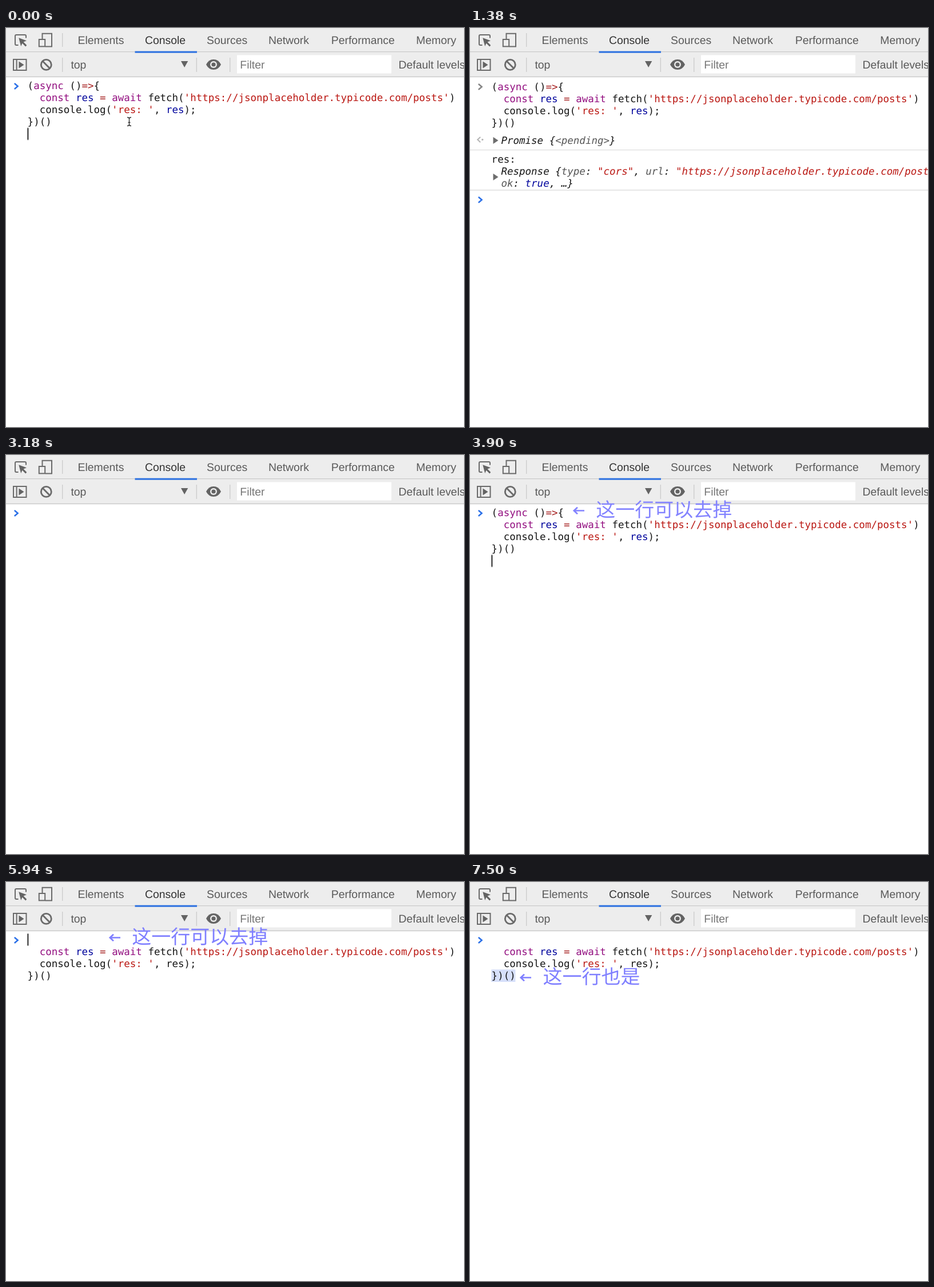
An HTML page that plays this animation: 801x699 px, repeating every 8 s.

```html
<!DOCTYPE html>
<html lang="zh-CN">
<head>
<meta charset="utf-8">
<title>Console await</title>
<style>
html, body { margin: 0; width: 100%; height: 100%; overflow: hidden; background: #fff; }
svg { display: block; width: 801px; height: 699px; }
text { white-space: pre; text-rendering: geometricPrecision; }

.ui { font: 19.4px "Liberation Sans", Arial, sans-serif; fill: #5a5a5a; }
.code { font: 17.5px "DejaVu Sans Mono", Menlo, monospace; fill: #161616; }
.it { font-style: italic; }
.k { fill: #930f80; }
.s { fill: #ba1712; }
.o { fill: #a31a1a; }
.v { fill: #00049c; }
.g { fill: #565656; }
.icon { fill: none; stroke: #6a6a6a; stroke-width: 2; }
.solid { fill: #636363; }
.rule { stroke: #cacaca; stroke-width: 1.3; }
.thin { stroke: #dedede; stroke-width: 1.3; }
.chev { fill: none; stroke-width: 2.5; }
.sel { fill: #d6dffa; }
.note { font: 34px "Noto Sans CJK SC", "Noto Sans CJK", sans-serif; fill: #7f7fff; }
.note path { fill: none; stroke: #7f7fff; stroke-width: 2.7; }

/* One shared 8 s clock; percentages are ms / 80. */
.a { animation: 8s step-end -10ms infinite; }
.pointer { animation-name: pointer; }
.caret { animation-name: caret; }
.prompt { animation-name: prompt; }
.cmd { animation-name: cmd; }
.first { animation-name: first; }
.name { animation-name: name; }
.ran { animation-name: ran; }
.reply { animation-name: reply; }
.split { animation-name: split; }
.sel1 { animation-name: sel1; }
.sel2 { animation-name: sel2; }
.note1 { animation-name: note1; animation-timing-function: linear; }
.note2 { animation-name: note2; animation-timing-function: linear; }

@keyframes pointer { 0% { opacity: 1 } 6%, 100% { opacity: 0 } }
@keyframes caret {
  0% { transform: translateY(84.5px); opacity: 1 }
  6% { transform: translateY(84.5px); opacity: 0 }
  9.75% { transform: translateY(127.5px); opacity: 1 }
  14.25% { transform: translateY(199.5px); opacity: 1 }
  16% { transform: translateY(199.5px); opacity: 0 }
  22.25% { transform: translateY(199.5px); opacity: 1 }
  28.5% { transform: translateY(199.5px); opacity: 0 }
  31.5% { transform: none; opacity: 0 }
  33.75% { transform: none; opacity: 1 }
  39.75% { transform: none; opacity: 0 }
  45.75% { transform: translateY(84.5px); opacity: 1 }
  51.75% { transform: translateY(84.5px); opacity: 0 }
  54.75% { transform: translateY(63px); opacity: 1 }
  55.5% { transform: translateY(42px); opacity: 1 }
  56.25% { transform: translateY(21px); opacity: 1 }
  57% { transform: none; opacity: 1 }
  58.5% { transform: none; opacity: 0 }
  74.25% { transform: none; opacity: 1 }
  80.25% { transform: none; opacity: 0 }
  81.75% { transform: translateY(21px); opacity: 1 }
  83.25% { transform: translateY(42px); opacity: 1 }
  86.25% { transform: translateY(63px); opacity: 1 }
  91.5%, 100% { transform: translateY(63px); opacity: 0 }
}
@keyframes prompt {
  0% { transform: none }
  9.75% { transform: translateY(127px) }
  14.25% { transform: translateY(199px) }
  31.5%, 100% { transform: none }
}
@keyframes cmd {
  0% { transform: none; opacity: 1 }
  9.75% { transform: translateY(2px); opacity: 1 }
  31.5% { transform: none; opacity: 0 }
  45.75%, 100% { transform: none; opacity: 1 }
}
@keyframes first { 0% { opacity: 1 } 74.25%, 100% { opacity: 0 } }
@keyframes name { 0% { fill: #00049c } 74.25%, 100% { fill: #161616 } }
@keyframes ran { 0% { opacity: 0 } 9.75% { opacity: 1 } 31.5%, 100% { opacity: 0 } }
@keyframes reply { 0% { opacity: 0 } 14.25% { opacity: 1 } 31.5%, 100% { opacity: 0 } }
@keyframes split { 0% { transform: none } 14.25%, 100% { transform: translateY(2px) } }
@keyframes sel1 {
  0% { width: 0 }
  57.75% { width: 0; animation-timing-function: steps(12) }
  66.75% { width: 126.4px }
  74.25%, 100% { width: 0 }
}
@keyframes sel2 {
  0% { width: 0 }
  90.75% { width: 0; animation-timing-function: steps(4) }
  93.75%, 100% { width: 42.1px }
}
@keyframes note1 { 0%, 45.75% { opacity: 0 } 49%, 80% { opacity: 1 } 84%, 100% { opacity: 0 } }
@keyframes note2 { 0%, 86% { opacity: 0 } 87.25%, 100% { opacity: 1 } }
</style>
</head>
<body>
<svg viewBox="0 0 801 699">
  <rect width="801" height="699" fill="#fff"/>

  <!-- toolbars -->
  <rect width="801" height="85" fill="#ededed"/>
  <path class="rule" d="M0 41.7H801M0 85.5H801M98.7 9V33M98.7 52V77M333.3 52V77M391.7 52V77"/>
  <rect x="225.5" y="40.6" width="108.5" height="3" fill="#2a6fe0"/>
  <rect x="404" y="47.5" width="270" height="32" fill="#fff"/>
  <g class="ui">
    <text x="125.6" y="28.3">Elements</text>
    <text x="243" y="28.3" fill="#333" style="fill:#333">Console</text>
    <text x="351" y="28.3">Sources</text>
    <text x="458.9" y="28.3">Network</text>
    <text x="568.8" y="28.3">Performance</text>
    <text x="717.3" y="28.3">Memory</text>
    <text x="113.4" y="71">top</text>
    <text x="409.3" y="71" style="fill:#757575">Filter</text>
    <text x="686.5" y="71">Default levels</text>
  </g>
  <path class="solid" d="M306 58H318.3L312.1 69Z"/>

  <!-- toolbar icons -->
  <path class="icon" d="M21.5 30H18Q16 30 16 28V14Q16 12 18 12H33Q35 12 35 14V17.5"/>
  <path class="solid" d="M22.3 17.2L36 22.3L30.6 24.6L36.3 30.3L34.2 32.4L28.5 26.7L26.2 32Z"/>
  <path class="icon" d="M63.5 19V9.8H80V32.4H69"/>
  <rect class="icon" x="57.8" y="20" width="10.4" height="12.4"/>
  <path class="icon" d="M13 55H35.5V74H13ZM18.6 55V74"/>
  <path class="solid" d="M22.5 58.6L31.5 64.5L22.5 70.4Z"/>
  <circle class="icon" cx="70.3" cy="64.4" r="9" style="stroke-width:2.8"/>
  <path class="icon" d="M64 58.1L76.6 70.7" style="stroke-width:2.8"/>
  <path class="solid" d="M350 64Q354.5 55 363 55T376 64Q371.500 73 363 73T350 64Z"/>
  <circle cx="363" cy="64" r="6" fill="#ededed"/>
  <circle class="solid" cx="363" cy="64" r="3.6"/>

  <!-- selections -->
  <rect class="a sel sel1" x="37.3" y="90.500" height="21.5"/>
  <rect class="a sel sel2" x="37.3" y="153.3" height="21.7"/>

  <!-- command -->
  <g class="a cmd code">
    <text class="a first" x="37.6" y="107.2">(<tspan class="k">async</tspan> ()<tspan class="o">=&gt;</tspan>{</text>
    <text x="37.6" y="128.1">  <tspan class="k">const</tspan> <tspan class="v">res</tspan> <tspan class="o">=</tspan> <tspan class="k">await</tspan> fetch(<tspan class="s">'https://jsonplaceholder.typicode.com/posts'</tspan>)</text>
    <text x="37.6" y="149">  console.log(<tspan class="s">'res: '</tspan>, <tspan class="a name">res</tspan>);</text>
    <text x="37.6" y="169.6">})()</text>
  </g>

  <!-- output -->
  <g class="a ran">
    <path class="chev" stroke="#858585" d="M14.800 98L20.6 103L14.800 108"/>
    <path class="chev" stroke="#b4b4b4" d="M18.200 191L13.300 195.600L18.200 200.200" style="stroke-width:2"/>
    <circle cx="21.8" cy="195.6" r="1.7" fill="#b4b4b4"/>
    <path fill="#6e6e6e" d="M40.5 191L49.5 197L40.5 203Z"/>
    <text class="code it" x="54.4" y="203">Promise {<tspan class="g">&lt;pending&gt;</tspan>}</text>
    <path class="a split thin" d="M0 211.700H801"/>
  </g>
  <g class="a reply">
    <text class="code" x="37.6" y="236">res:</text>
    <path fill="#6e6e6e" d="M40.5 255L49.500 261L40.5 267Z"/>
    <text class="code it" x="54.4" y="256.900">Response {<tspan class="g">type</tspan>: <tspan class="s">"cors"</tspan>, <tspan class="g">url</tspan>: <tspan class="s">"https://jsonplaceholder.typicode.com/posts"</tspan>,</text>
    <text class="code it" x="54.4" y="277.700"><tspan class="g">ok</tspan>: <tspan class="v">true</tspan>, …}</text>
    <path class="thin" d="M0 284H801"/>
  </g>

  <!-- prompt, caret, mouse -->
  <path class="a prompt chev" stroke="#2a6fe8" d="M14.800 97L20.600 102L14.800 107"/>
  <rect class="a caret" x="37.500" y="90.500" width="1.8" height="21" fill="#111"/>
  <path class="a pointer" d="M212 156.500Q215.500 156.500 215.500 159V169Q215.500 171.500 212 171.500M219 156.500Q215.500 156.500 215.500 159M215.500 169Q215.500 171.500 219 171.500M213.500 165.500H217.500" fill="none" stroke="#333" stroke-width="1.4"/>

  <!-- annotations -->
  <g class="a note note1">
    <path d="M200 97.500H182M188 91.700L181.800 97.500L188 103.300"/>
    <text x="220.300" y="108">这一行可以去掉</text>
  </g>
  <g class="a note note2">
    <path d="M107 167.500H89M95 161.700L88.800 167.500L95 173.300"/>
    <text x="127.600" y="178">这一行也是</text>
  </g>
</svg>
</body>
</html>
```
